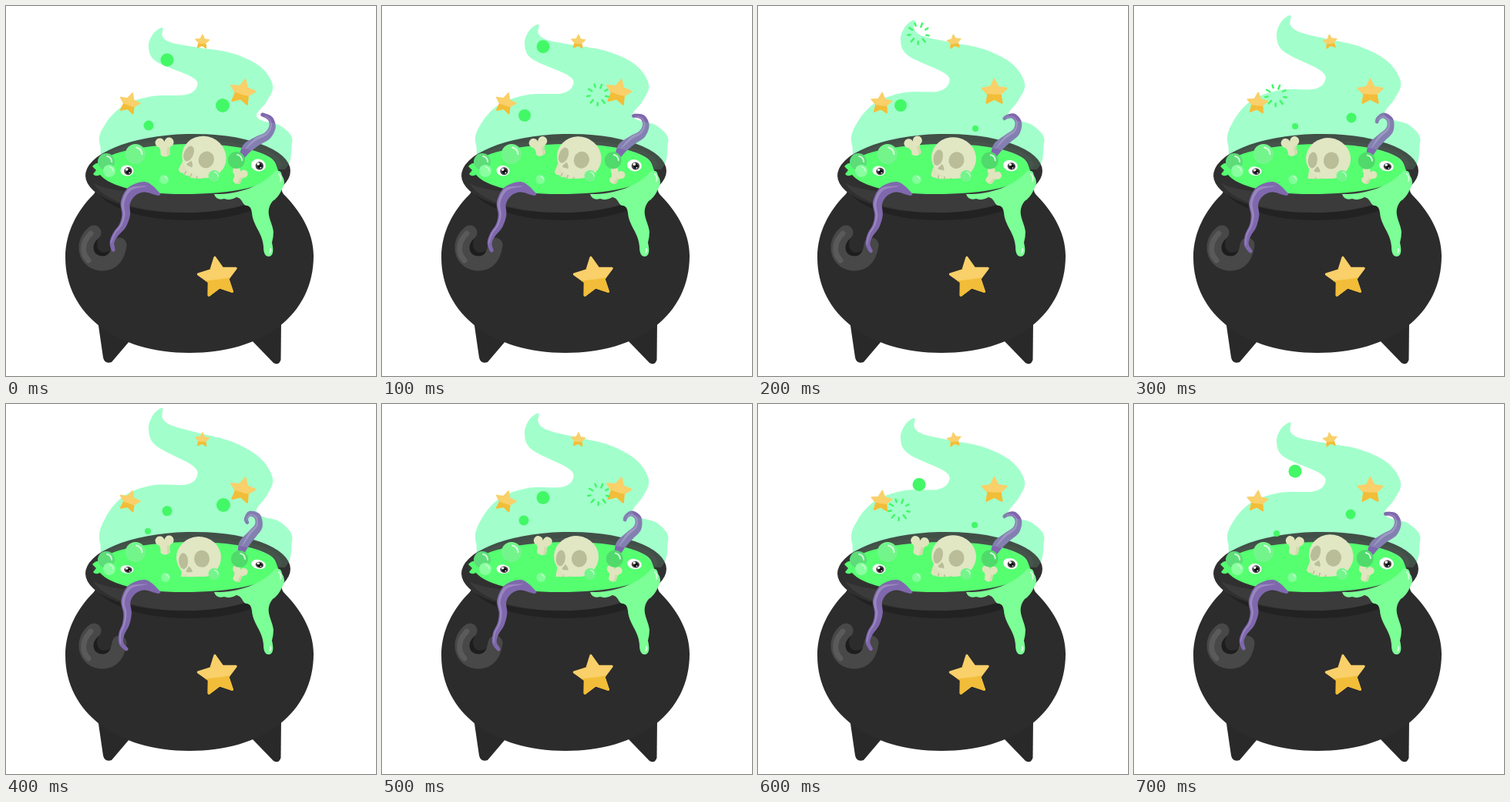
An HTML page for the animation above (800 ms loop, 480 px wide and 480 px high).

```html
<!DOCTYPE html>
<html lang="en">
<head>
<meta charset="utf-8">
<title>Bubbling cauldron</title>
<style>
html, body { margin: 0; width: 100%; height: 100%; overflow: hidden; background: #fff; }
svg { display: block; width: 100vw; height: 100vh; }
</style>
</head>
<body>
<svg viewBox="0 0 480 480">
  <defs>
    <clipPath id="facet"><path d="M-40-2Q0 6 40 1V40H-40Z"/></clipPath>
    <clipPath id="water"><path d="M200 150H310V219Q270 225 225 224H200Z"/></clipPath>
    <clipPath id="back"><path d="M90 0H400V212H352C346 190 300 178 236 179C180 180 132 189 121 204H90Z"/></clipPath>
  </defs>

  <path class="smoke" fill="#a2ffcb"/>

  <g fill="#292929">
    <path d="M119 408L126 456Q128 465 137 462L160 435Z"/>
    <path d="M357 408L356.500 459Q354 467 347 463L318 433Z"/>
  </g>
  <path fill="#2c2c2c" d="M112 228Q120 238 113 245C93 265 77 293 77 326C77 401 145 450 238 450C333 450 399 401 399 324C399 292 380 264 360 244Q355 238 361 226Z"/>
  <path fill="#222" d="M112 234C128 262 175 278 236 278C296 278 341 263 358 236L350 220H120Z"/>
  <ellipse cx="236" cy="217" rx="133" ry="51" fill="#303030" transform="rotate(-1.500 236 217)"/>
  <path fill="#3b3b3b" d="M113 230C140 243 185 243 229 243C270 243 300 243 330 230L348 238C322 259 280 268 236 268C180 268 130 256 113 230Z"/>
  <path fill="#363636" d="M112 213C112 188 168 174 236 174C304 174 355 185 358 207L350 216L114 218Z"/>
  <path fill="#55ff70" d="M112 208Q117 203 121 204C132 189 180 180 236 179C300 178 346 190 350 205L354 216C342 234 294 244 229 244C174 244 135 234 122 219Q116 222 113 218L117 213Z"/>

  <path fill="none" stroke="#1d1d1d" stroke-width="11" d="M119 293C107 308 113 327 130 325Q144 323 145 306"/>
  <path fill="none" stroke="#484848" stroke-width="19" stroke-linecap="round" d="M114 294C97 307 102 334 126 334Q144 333 147 310"/>
  <path fill="none" stroke="#5a5a5a" stroke-width="7" stroke-linecap="round" d="M110 295C98 307 98 321 107 330"/>

  <g id="rightArm"></g>
  <g clip-path="url(#back)"><path class="smoke" fill="#a2ffcb" opacity=".15"/></g>
  <g id="sparks"></g>
  <g id="pot"></g>

  <path fill="#7cff96" d="M270 244C294 245 330 237 349 214Q357 212 358 220Q364 228 358 238Q353 249 346 253C334 268 346 280 347 293Q347 299 345 307Q349 324 341 325Q334 325 334 312C333 294 320 285 319 268Q318 260 313 259C306 259 308 250 299 248Q291 253 283 250Q273 253 270 244Z"/>
  <path fill="none" stroke="#d5ffdd" stroke-width="2" stroke-linecap="round" d="M354 218Q358 222 356 227M343 315Q344 318 342 320"/>
  <g id="leftArm"></g>
  <g id="badge"></g>
</svg>
<script>
const STEP = 100, STEPS = 8;
const el = id => document.getElementById(id);
const mix = (a, b, t) => a + (b - a) * t;
const clamp = v => Math.min(1, Math.max(0, v));
const place = (x, y, turn, body) => `<g transform="translate(${x} ${y}) rotate(${turn})">${body}</g>`;
const dot = (x, y, r, fill) => `<circle cx="${x}" cy="${y}" r="${r}" fill="${fill}"/>`;
const oval = (x, y, rx, ry, fill) => `<ellipse cx="${x}" cy="${y}" rx="${rx}" ry="${ry}" fill="${fill}"/>`;

// Closed Catmull-Rom curve through the points.
function blob(pts) {
  const n = pts.length, at = i => pts[(i + n) % n];
  let d = `M${at(0)}`;
  for (let i = 0; i < n; i++) {
    const [a, b, c, e] = [at(i - 1), at(i), at(i + 1), at(i + 2)];
    const h1 = b.map((v, j) => v + (c[j] - a[j]) / 6);
    const h2 = c.map((v, j) => v - (e[j] - b[j]) / 6);
    d += `C${h1} ${h2} ${c}`;
  }
  return d + "Z";
}

const plume = [[203, 28], [203, 40], [216, 48], [250, 54], [292, 61], [329, 78], [346, 103],
  [338, 124], [325, 141], [333, 149], [357, 156], [371, 178], [340, 222], [150, 222], [122, 180],
  [129, 153], [153, 129], [190, 117], [234, 115], [248, 104], [241, 92], [195, 72], [185, 53], [191, 36]];

// The plume stretches upward, most at its tip and least on the right.
const stretch = p => plume.map(([x, y]) =>
  [x, y - 23 * p * clamp((170 - y) / 142) ** 0.7 * (1 - 0.55 * clamp((x - 203) / 140))]);

// Walks along the headings; the curl turns the tip more than the base.
function limb({ x, y, long, short, headings, bend, curl }, p) {
  const pts = [[x, y]], last = headings.length - 1;
  headings.forEach((h, i) => {
    const t = i / last, a = (h - p * (bend + curl * t ** 2.2)) * Math.PI / 180;
    x += Math.cos(a) * mix(long, short, t);
    y += Math.sin(a) * mix(long, short, t);
    pts.push([x, y]);
  });
  return pts;
}

// Band around a line, tapered at both ends, from side lo to side hi (-1..1).
function band(pts, wide, lo, hi) {
  const last = pts.length - 1;
  const side = s => pts.map(([x, y], i) => {
    const a = pts[Math.max(0, i - 1)], b = pts[Math.min(last, i + 1)], t = i / last;
    const dx = b[0] - a[0], dy = b[1] - a[1];
    const w = s * wide * mix(1, 0.25, t) * Math.min(1, 0.25 + 5 * t) / 2 / Math.hypot(dx, dy);
    return [x - dy * w, y + dx * w];
  });
  return blob(side(lo).concat(side(hi).reverse()));
}

function arm(spec, p) {
  const pts = limb(spec, p), s = spec.lit;
  return `<path fill="#7f68ad" d="${band(pts, spec.wide, -1, 1)}"/>` +
    `<path fill="#9987bf" d="${band(pts.slice(1, -1), spec.wide * 0.9, 0.25 * s, 0.8 * s)}"/>`;
}

const leftArm = { x: 198, y: 244, long: 19.5, short: 11, wide: 17, lit: 1, bend: 0, curl: 32,
  headings: [208, 162, 120, 87, 108, 129, 115, 80] };
const rightArm = { x: 303, y: 201, long: 19, short: 6, wide: 15, lit: -1, bend: 14, curl: 115,
  headings: [-60, -35, -28, -60, -101, -146, -160] };

function star(x, y, r, turn) {
  const pts = Array.from({ length: 10 }, (_, i) => {
    const a = i * Math.PI / 5, q = i % 2 ? r * 0.5 : r;
    return [q * Math.sin(a), -q * Math.cos(a)];
  }).join(" ");
  const shape = (fill, extra) => `<g ${extra}><polygon points="${pts}" fill="${fill}" stroke="${fill}" stroke-width="${r * 0.12}" stroke-linejoin="round"/></g>`;
  return place(x, y, turn, shape("#f9d06a", "") + shape("#f2bd38", 'clip-path="url(#facet)"'));
}

function burst(x, y, r) {
  let d = "";
  for (let i = 0; i < 9; i++) {
    const a = i * Math.PI * 2 / 9 + 0.2, c = Math.cos(a), s = Math.sin(a);
    const q = r * (i % 2 ? 0.65 : 0.75);
    d += `M${x + c * q} ${y + s * q}L${x + c * r} ${y + s * r}`;
  }
  return `<path d="${d}" fill="none" stroke="#43f867" stroke-width="2.500" stroke-linecap="round"/>`;
}

function bubble(x, y, r, fill) {
  return dot(x, y, r, fill) +
    `<path d="M${x + r * 0.1} ${y - r * 0.65}Q${x + r * 0.6} ${y - r * 0.55} ${x + r * 0.65} ${y}" fill="none" stroke="#d3ffdb" stroke-width="${r * 0.17}" stroke-linecap="round"/>`;
}

function bone(x, y, turn, size) {
  const c = "#e0e5bd";
  return place(x, y, turn, `<g transform="scale(${size})">` + dot(-6, -6, 6, c) + dot(6, -6, 6, c) +
    `<path fill="${c}" d="M-7-7H7Q9-2 6 3V10Q0 15-6 10V3Q-9-2-7-7Z"/>` +
    `<path fill="#d4d9ae" d="M3 1H6V10Q4 12 2 12Z"/></g>`);
}

function skull(p) {
  const hole = "#b9be98";
  const teeth = [-14, -6, 2].map(x => `M${x} 31V26`).join("");
  return `<g clip-path="url(#water)">` + place(mix(257, 250, p), mix(196, 199, p), mix(24, -2, p),
    `<path fill="#dfe3bd" d="M-23 13L-24 28Q-21 32-17 30Q-13 33-9 30Q-5 33-1 30Q5 33 9 28L13 14Z"/>` +
    oval(0, 0, 29, 27, "#e1e6c3") + oval(-20, 4, 6, 10.5, hole) + oval(4, 2, 10, 11, hole) +
    `<path fill="${hole}" d="M-13 11Q-8 16-9 19Q-12 18-13 19Q-17 19-17 17Z"/>` +
    `<path d="${teeth}" stroke="${hole}" stroke-width="1.500"/>`) + "</g>";
}

function eye(x, y, rx, open, turn) {
  return place(x, y, turn, `<g transform="scale(1 ${open})">` + oval(0, 0, rx, rx * 0.83, "#fff") +
    dot(1.5, 0.5, 5.2, "#444") + dot(2, 1, 3, "#111") + dot(-0.5, -1.5, 1.8, "#fff") + dot(3.5, 2.5, 0.9, "#fff") + "</g>");
}

// Bubbles that start at a step, rise steadily while growing, then pop.
const risers = [
  { from: 3, life: 8, x: 209, y: 156, speed: 17.2, max: 8.5 },
  { from: 2, life: 4, x: 282, y: 159, speed: 14, max: 9 },
  { from: 6, life: 4, x: 281, y: 157, speed: 14, max: 10 },
  { from: 7, life: 5, x: 185, y: 168, speed: 13, max: 8 },
  { from: 4, life: 3, x: 184, y: 165, speed: 14, max: 8 }
];

function riser({ from, life, x, y, speed, max }, k) {
  const age = (k - from + STEPS) % STEPS, up = y - speed * age;
  if (age >= life) return "";
  return age < life - 1 ? dot(x, up, Math.min(max, 4 + 2.5 * age), "#43f867") : burst(x - 1, up, 14);
}

function draw(k) {
  const p = (1 - Math.abs(k / 4 - 1)) ** 1.25;
  const wave = Math.sin(k * Math.PI / 4);
  const tilt = k % 4 < 2 ? 1 : 0;
  const open = mix(1, 0.75, p);

  const smoke = blob(stretch(p));
  document.querySelectorAll(".smoke").forEach(s => s.setAttribute("d", smoke));
  el("sparks").innerHTML = star(254.5, 46.5, 9.5, tilt ? 3 : -8) + star(306.5, 112, 17, 14 * tilt) +
    star(160, 126.5, 14, 5 + 12 * tilt) + risers.map(b => riser(b, k)).join("");

  el("rightArm").innerHTML = arm(rightArm, p);
  el("leftArm").innerHTML = arm(leftArm, p);

  el("pot").innerHTML =
    bubble(130, 202, 11, "#5ddd79") + bubble(168, 192, 13, "#74f58b") + bubble(134, 214, 8, "#8affa0") +
    eye(157, mix(213.5, 214.5, p), 8.5, open, 5) + eye(327.5, mix(206.5, 208, p), 9.5, open, 12) +
    bone(206 - 3 * wave, 183 - wave, -4 - 14 * wave, 1) + skull(p) +
    bone(302 + 2 * wave, 220.5 + 0.5 * wave, 22 + 13 * wave, 0.84) +
    bubble(mix(205, 207, p), 225, 6, "#82ff98") + bubble(270, 220.5, 7.5, "#74f58b") +
    bubble(mix(299, 303, p), mix(200, 201, p), 11, "#50da6b");
}

el("badge").innerHTML = star(275, 352, 26, -9);

let shown = -1;
function tick(now) {
  const k = Math.floor(now / STEP) % STEPS;
  if (k !== shown) draw(shown = k);
  requestAnimationFrame(tick);
}
draw(0);
requestAnimationFrame(tick);
</script>
</body>
</html>
```
